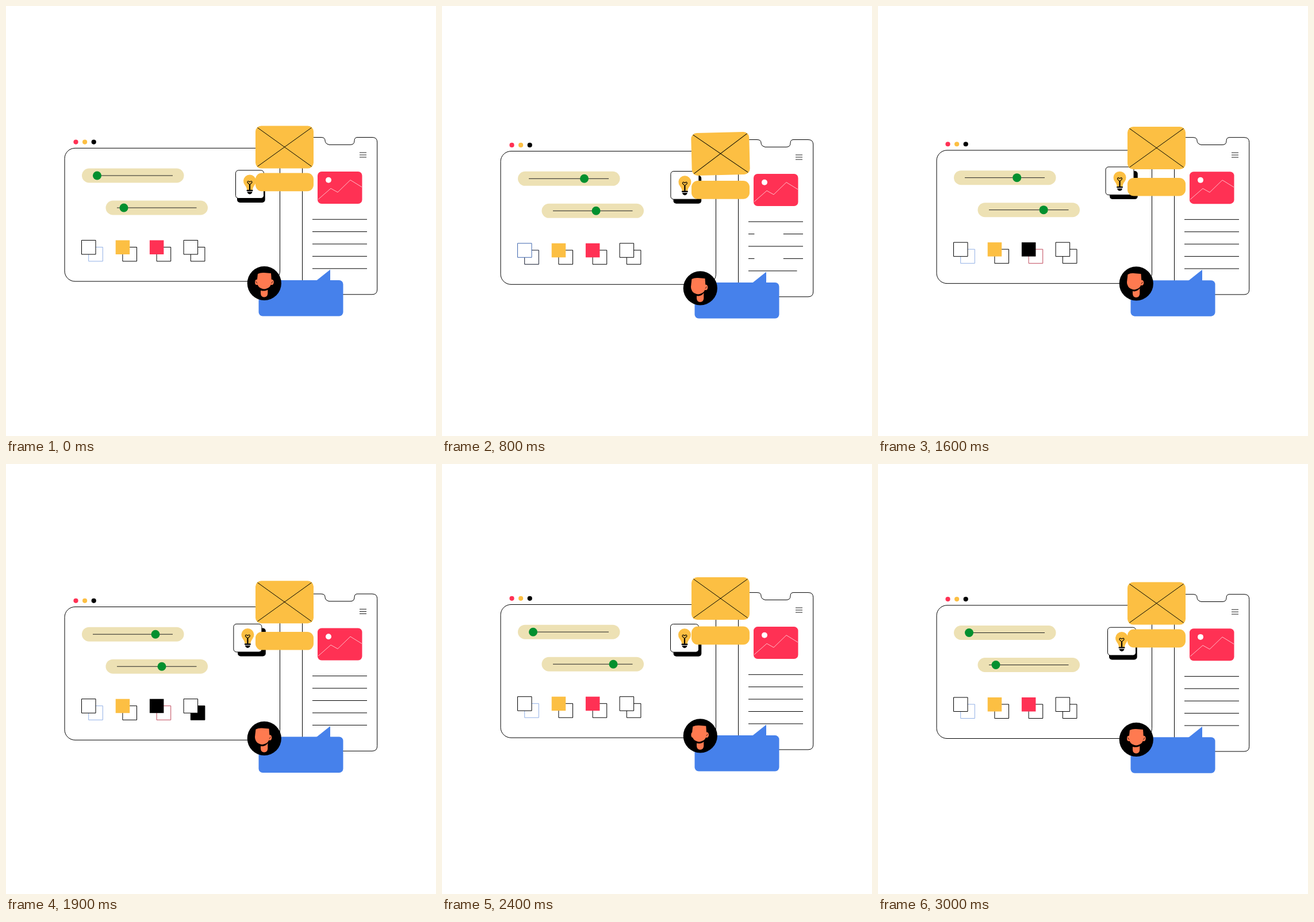
Recreate the animation shown at these times as an HTML page with a canvas. Size 748 px wide and 748 px high, loop 3100 ms.

```html
<!DOCTYPE html>
<html lang="en">
<head>
<meta charset="utf-8">
<title>Interface builder</title>
<style>
  html, body { margin: 0; width: 100%; height: 100%; overflow: hidden; background: #fff; }
  canvas { display: block; width: 748px; height: 748px; }
</style>
</head>
<body>
<canvas id="stage" width="748" height="748"></canvas>
<script>
const ctx = document.getElementById('stage').getContext('2d');
const LOOP = 3100, STEP = 100;
const BLACK = '#000', WHITE = '#fff', YELLOW = '#fcbf43', PINK = '#ff3154',
      GREEN = '#03902f', SAND = '#ede1b4', BLUE = '#4681eb', SKIN = '#ff7a50';

// Motion tracks: one value per key time, joined by monotone cubics
const TIMES = [0, 400, 800, 1200, 1900, 2400, 3000];
const tracks = {
  window:   [0, 2.2, 5.3, 5.7, 1.2, -2.8, -1.5],
  phone:    [0, 2.1, 4, 3.3, -2.5, -4.9, -1.8],
  envelope: [0, 6.4, 11.4, 9.5, -5.3, -11.5, -3],
  bar:      [0, 6.3, 13.6, 14.5, 1.4, -8, -3],
  avatar:   [0, 4.5, 8.5, 7, -5, -9.5, -3],
  cardX:    [0, -0.2, -1.6, -3, -3.6, -2, 0],
  cardY:    [0, 1.7, 1.7, -1.8, -7.5, -7.3, -1.6],
  knob1:    [158.5, 218, 247.5, 213.5, 260, 158.5, 158.5],
  knob2:    [205, 205, 268, 314.5, 271, 298, 205],
  turn:     [0, 0.85, 1, 1, 1, 0.5, 0]
};

function sample(v, t) {
  const last = TIMES.length - 1;
  const slope = i => (v[i + 1] - v[i]) / (TIMES[i + 1] - TIMES[i]);
  const tangent = i => {
    if (i === 0) return slope(0);
    if (i === last) return slope(last - 1);
    const a = slope(i - 1), b = slope(i);
    return a * b > 0 ? 2 * a * b / (a + b) : 0;
  };
  let i = 0;
  while (i < last - 1 && t >= TIMES[i + 1]) i++;
  const h = TIMES[i + 1] - TIMES[i], u = (t - TIMES[i]) / h, w = 1 - u;
  return v[i] * w * w * (1 + 2 * u) + v[i + 1] * u * u * (3 - 2 * u)
       + h * u * w * (tangent(i) * w - tangent(i + 1) * u);
}

function paint(fill, stroke, width = 1) {
  if (fill) { ctx.fillStyle = fill; ctx.fill(); }
  if (stroke) { ctx.strokeStyle = stroke; ctx.lineWidth = width; ctx.stroke(); }
}
function box(x, y, w, h, r, fill, stroke) {
  ctx.beginPath();
  ctx.roundRect(x, y, w, h, r);
  paint(fill, stroke);
}
function disc(x, y, rx, fill, ry = rx) {
  ctx.beginPath();
  ctx.ellipse(x, y, rx, ry, 0, 0, 2 * Math.PI);
  paint(fill);
}
function line(points, stroke = BLACK, width = 1) {
  ctx.beginPath();
  for (let i = 0; i < points.length; i += 2) ctx.lineTo(points[i], points[i + 1]);
  paint(null, stroke, width);
}
function shape(d, fill, stroke, width = 1) {
  const path = new Path2D(d);
  if (fill) { ctx.fillStyle = fill; ctx.fill(path); }
  if (stroke) { ctx.strokeStyle = stroke; ctx.lineWidth = width; ctx.stroke(path); }
}
function at(x, y, draw) {
  ctx.save();
  ctx.translate(x, y);
  draw();
  ctx.restore();
}

function slider(x, y, from, to, knob) {
  box(x, y - 12.5, 177.5, 25, 12.5, SAND);
  line([from, y, to, y], '#222');
  disc(knob, y, 7.5, GREEN);
}

function swatch(i, front, frontEdge, backEdge, back) {
  const x = 131.5 + i * 59.2;
  box(x + 12.2, 419.5, 24.6, 24.5, 0, back, backEdge);
  box(x, 407.5, 24.5, 24.5, 0, front, frontEdge);
}

function drawWindow(t, s) {
  box(102, 247.3, 374.5, 231.7, 18, null, BLACK);
  [PINK, YELLOW, BLACK].forEach((c, i) => disc(121.5 + i * 15.6, 236.6, 4.1, c));
  slider(132, 295, 151, 290, s.knob1);
  slider(173.5, 351, 193, 331.5, s.knob2);

  const during = (a, b) => t >= a && t < b;
  const first = during(600, 1500), second = during(1000, 1600),
        third = during(1600, 2200), fourth = during(1700, 2200);
  swatch(0, WHITE, first ? '#3f66ae' : BLACK, first ? '#10182c' : '#92b0e6');
  swatch(1, second ? BLACK : YELLOW, null, second ? '#b98a3c' : BLACK);
  swatch(2, third ? BLACK : PINK, null, third ? '#c0495c' : BLACK);
  swatch(3, WHITE, BLACK, BLACK, fourth ? BLACK : null);
}

// A text line with a gap that sweeps from left to right
function textLine(y, head) {
  const x = 533, w = 95, clamp = v => Math.max(0, Math.min(1, v));
  const a = clamp(head - 0.53), b = clamp(head);
  if (a > 0) line([x, y, x + w * a, y]);
  if (b < 1) line([x + w * b, y, x + w, y]);
}

function drawPhone(t) {
  shape('M524 228.5H548Q555 228.5 555 234T562 241.3H599Q606 241.3 606 234.5T613 228.5' +
        'H637Q645.7 228.5 645.7 237V493Q645.7 501.8 637 501.8H524Q515.5 501.8 515.5 493' +
        'V237Q515.5 228.5 524 228.5Z', WHITE, BLACK);
  for (const y of [255, 259, 263]) line([615, y, 627, y], '#222');
  box(542, 288, 77.5, 56, 7, PINK);
  disc(561, 302.7, 5, WHITE);
  line([543, 336.5, 565, 317.3, 577, 324, 599, 302.7, 619, 315], '#ffd0d6', 0.9);
  [395, 640, 410, 640, 445].forEach((start, i) =>
    textLine(371.2 + i * 21.4, (t - start) * 0.004));
}

function drawBulb() {
  box(399.5, 285.8, 49, 48.7, 5, WHITE, BLACK);
  shape('M419 320Q419 316 415.5 311.5A11 11 0 1 1 432.5 311.5Q429 316 429 320Z', YELLOW);
  shape('M424 320V311L420 307Q420 303 424 306Q428 303 428 307L424 311', null, BLACK, 1.1);
  line([424, 311, 424, 320], BLACK, 2.2);
  box(418.5, 319.8, 11, 2.4, 1.2, BLACK);
  shape('M419.5 323.3H428.5Q427.5 327.3 424 327.5Q420.5 327.3 419.5 323.3Z', BLACK);
}

function drawEnvelope(t) {
  const u = Math.max(0, Math.min(1, (t - 700) / 500));
  ctx.rotate(-4.2 * Math.sin(Math.PI * u) ** 2 * Math.PI / 180);
  box(-50.5, -37, 101, 74, 10, YELLOW);
  line([-47, -34, 47, 33.5]);
  line([47, -34, -47, 33.5]);
}

function drawAvatar(turn) {
  disc(449.3, 482.4, 29.6, BLACK);
  shape('M443 495Q450 497 455.3 490V500Q455 506 449 506.5Q443.3 506 443 500Z', SKIN);
  at(-3.5 * turn, turn * 0.5, () => {
    disc(449, 482.5, 12, BLACK, 13);
    disc(436.3 + 4 * turn, 480.5, 3.2, SKIN, 4.8);
    disc(462.4, 480.5, 3.4, SKIN, 4.8);
    shape('M438 466Q443 463.5 449 464T461 465L462 479Q461.5 491 449 492.5Q437 491 436.5 479Z', SKIN);
    line([461.5, 482.5, 464, 479], BLACK, 0.8);
    if (turn < 0.4) line([434.5, 479, 437, 482.5], BLACK, 0.8);
  });
}

function draw(t) {
  const s = {};
  for (const name in tracks) s[name] = sample(tracks[name], t);
  ctx.fillStyle = WHITE;
  ctx.fillRect(0, 0, 748, 748);
  at(0, s.window, () => drawWindow(t, s));
  at(0, s.phone, () => drawPhone(t));
  at(-0.3 * s.cardX, s.cardY, () => box(402, 293, 48.7, 49, 5, BLACK));
  at(s.cardX, s.cardY, drawBulb);
  at(0, s.bar, () => box(434, 290.5, 101, 31.7, 11, YELLOW));
  at(484.5, 245.6 + s.envelope, () => drawEnvelope(t));
  at(0, s.phone, () => {
    box(439.5, 477, 147, 62.5, 7, BLUE);
    shape('M539.5 478L564 458.5V478Z', BLUE);
  });
  at(0, s.avatar, () => drawAvatar(s.turn));
}

function tick() {
  draw(Math.floor(performance.now() % LOOP / STEP) * STEP);
  requestAnimationFrame(tick);
}
tick();
</script>
</body>
</html>
```
